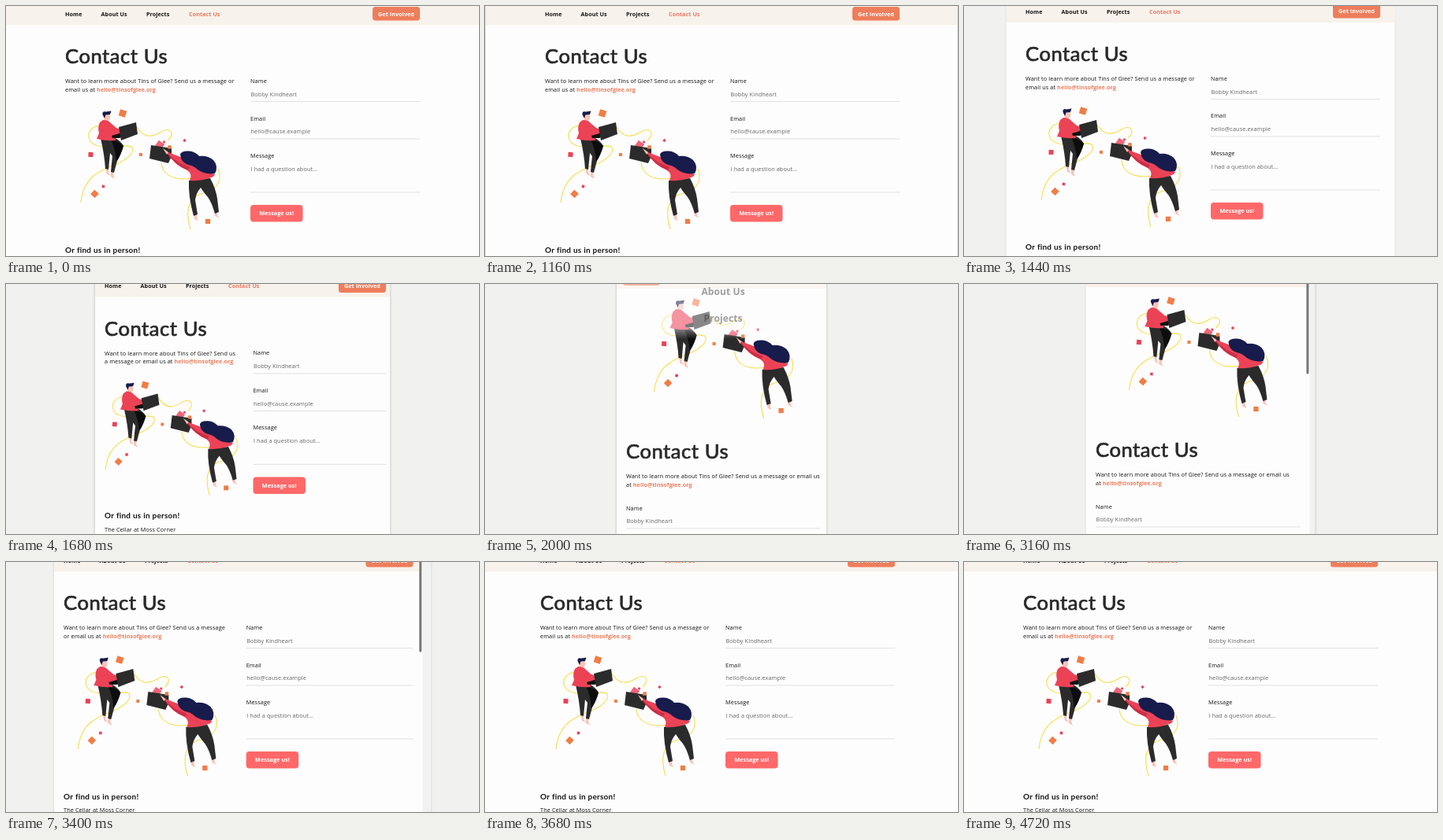
An HTML page with a canvas for the animation above (4.76 s loop, 600 by 318 pixels).

```html
<!DOCTYPE html>
<html lang="en">
<head>
<meta charset="utf-8">
<title>Responsive contact page</title>
<style>
  html, body { margin: 0; width: 100%; height: 100%; overflow: hidden; background: #f1f1f0; }
  canvas { display: block; width: 600px; height: 318px; }
</style>
</head>
<body>
<canvas id="stage"></canvas>
<script>
const W = 600, H = 318, LOOP = 4760, STEP = 40;
const LAYOUT_LAG = 14, BREAKPOINT = 351, PAD = 12, MAX_WIDTH = 450;
const RED = '#ec4256', ORANGE = '#f07d47', NAVY = '#171c4c', BLACK = '#2b2b2b',
      SKIN = '#f9c3b8', YELLOW = '#f8dc4c', INK = '#151515', TITLE = '#282828',
      CORAL = '#ee7d5b', PAPER = '#fdfdfd';
const SANS = '"Open Sans", sans-serif', ROUND = 'Lato, sans-serif';

const canvas = document.getElementById('stage');
const ctx = canvas.getContext('2d');
const dpr = window.devicePixelRatio || 1;
canvas.width = W * dpr;
canvas.height = H * dpr;

// [time, value] pairs
const HALF_WIDTH = [[0, 300], [1140, 300], [1160, 299], [1280, 286], [1680, 187], [1840, 157],
  [2000, 133], [2320, 114], [3020, 114], [3060, 120], [3160, 145.5], [3520, 286], [3640, 287], [3680, 300]];
const SCROLL = [[0, 0], [1280, 0], [1680, 7.6], [2000, 18], [2500, 18], [2800, 20], [3200, 20], [3260, 12]];

function track(keys, t) {
  const i = keys.findIndex(k => k[0] > t);
  if (i < 0) return keys[keys.length - 1][1];
  if (i === 0) return keys[0][1];
  const [t0, a] = keys[i - 1], [t1, b] = keys[i];
  return a + (b - a) * (t - t0) / (t1 - t0);
}

function setFont(weight, size, spacing, family = SANS) {
  ctx.font = `${weight} ${size}px ${family}`;
  ctx.letterSpacing = spacing + 'px';
}
const regular = () => setFont(400, 7.3, 0.1);
const bold = () => setFont(700, 7.2, 0.06);

function text(str, x, y, color = INK, align = 'left') {
  ctx.textAlign = align;
  ctx.fillStyle = color;
  ctx.fillText(str, x, y);
}

function box(x, y, w, h, r, color) {
  ctx.fillStyle = color;
  ctx.beginPath();
  ctx.roundRect(x, y, w, h, r);
  ctx.fill();
}

function button(label, x, y, w, h, r, color) {
  box(x, y, w, h, r, color);
  bold();
  text(label, x + w / 2, y + h / 2 + 2.7, '#fff', 'center');
}

function shape(d, color) {
  ctx.fillStyle = color;
  ctx.fill(new Path2D(d));
}

function confetti(x, y, size, degrees, color) {
  ctx.save();
  ctx.translate(x, y);
  ctx.rotate(degrees * Math.PI / 180);
  ctx.fillStyle = color;
  ctx.fillRect(-size / 2, -size / 2, size, size);
  ctx.restore();
}

function ribbon(d) {
  ctx.strokeStyle = YELLOW;
  ctx.lineWidth = 1.1;
  ctx.stroke(new Path2D(d));
}

function drawMan() {
  shape('M126 205L130 205L130 212L133 216L128 214Z M133 209L137 209L136 215L138 220L133 217Z', SKIN);
  shape('M120 168L137 167Q146 172 149 178Q146 189 141 197L137 212L133 211Q134 200 135 191L132 187L130 208L126 207Q125 190 120 168Z', BLACK);
  shape('M133 170Q144 172 149 178Q146 189 140 198Q139 182 133 170Z', '#0d0d0d');
  shape('M124 138L132 138L132 144Q130 147 125 147Z', SKIN);
  shape('M122.5 138Q122 133 127 134.5L133.5 133.5L132 138L126.5 138.5L125 143Z', NAVY);
  shape('M123 145Q130 145 133 149L140 155L146 157L146 163L138 165L139 171Q128 172 115 169L118 162Q116 154 119 148Z', RED);
  shape('M134 165L144 162L150 165L144 168L135 168Z', '#111');
  shape('M143 154L165 148L167 163L146 171Z', BLACK);
}

function drawWoman() {
  shape('M238 264L243 264L242 269L244 273L239 271Z M264 260L269 260L268 266L271 270L265 267Z', SKIN);
  shape('M232 222L259 219Q266 232 268 245L270 262L265 264Q261 250 256 243Q250 236 247 231Q241 238 240 247L243 265L238 267Q231 242 232 222Z', BLACK);
  confetti(195, 177, 9, 35, '#ee6478');
  shape('M184 177L210 181L210 191L206 200L182 194Z', BLACK);
  shape('M203 185Q213 189 224 193L240 203Q255 210 265 214Q264 218 257 219Q246 223 233 222Q237 214 230 209Q214 203 203 185Z', RED);
  shape('M206 189L219 199L233 205L231 209Q215 203 204 187Z', '#c92f48');
  shape('M199 181L206 186L204 189Z', SKIN);
  shape('M221 189Q222 184 232 184.5Q240 185 245 191Q256 190 263 196Q270 204 265 213Q252 215 243 208Q238 203 231 202Q222 199 221 189Z', NAVY);
}

function drawIllustration(cx, top, scale) {
  ctx.save();
  ctx.translate(cx, top);
  ctx.scale(scale, scale);
  ctx.translate(-182.5, -128);
  ribbon('M95 250C98 222 112 212 135 203C155 196 163 186 160 180C155 173 118 187 107 172C100 160 112 150 124 153');
  ribbon('M166 154C176 170 187 166 197 160C207 153 216 162 205 171');
  ribbon('M197 199C198 214 212 223 236 219M269 207C276 225 265 235 247 239C229 246 228 264 234 284');
  drawMan();
  drawWoman();
  confetti(148, 136.5, 8.5, 17, ORANGE);
  confetti(112.5, 239, 7.5, 43, ORANGE);
  confetti(171, 189, 4, 5, ORANGE);
  confetti(207.5, 179.5, 4.5, 3, ORANGE);
  confetti(256, 274, 6.3, 0, ORANGE);
  confetti(107.5, 189, 6, 4, RED);
  confetti(123.5, 229.5, 3.5, 8, RED);
  confetti(200.5, 173, 2.8, 15, RED);
  confetti(226.5, 171, 3.2, 45, RED);
  ctx.restore();
}

// Draws the wrapped paragraph and returns the number of lines.
function drawIntro(x, y, width) {
  const address = 'hello@tinsofglee.org';
  const words = 'Want to learn more about Tins of Glee? Send us a message or email us at'.split(' ');
  bold();
  const addressWidth = ctx.measureText(address).width;
  regular();
  const space = ctx.measureText(' ').width;
  let dx = 0, lines = 1;
  words.forEach((word, i) => {
    const w = ctx.measureText(word).width;
    // The address stays on the same line as the word before it.
    const tail = i === words.length - 1 ? space + addressWidth : 0;
    if (dx + w + tail > width + 0.5) { dx = 0; lines++; }
    text(word, x + dx, y + (lines - 1) * 10.7);
    dx += w + space;
  });
  bold();
  text(address, x + dx, y + (lines - 1) * 10.7, CORAL);
  return lines;
}

function drawField(label, hint, x, y, w, lineY) {
  regular();
  text(label, x, y);
  text(hint, x + 0.5, y + 16.6, '#666');
  ctx.fillStyle = '#e2e2e2';
  ctx.fillRect(x, y + lineY, w, 1);
}

function drawForm(x, y, w) {
  drawField('Name', 'Bobby Kindheart', x, y, w, 23);
  drawField('Email', 'hello@cause.example', x, y + 47.5, w, 23);
  drawField('Message', 'I had a question about...', x, y + 95, w, 43.5);
  button('Message us!', x, y + 155, 66.5, 21.5, 4, '#ff6868');
}

function drawTitle(x, y) {
  setFont(400, 25.6, 0.55, ROUND);
  text('Contact Us', x, y, TITLE);
  ctx.strokeStyle = TITLE;
  ctx.lineWidth = 0.7;
  ctx.strokeText('Contact Us', x, y);
}

function drawVisit(x, y) {
  setFont(700, 10, 0.24, ROUND);
  text('Or find us in person!', x, y);
  regular();
  text('The Cellar at Moss Corner', x, y + 16.8);
}

function drawWide(x, w) {
  const col = (w - 20) / 2;
  bold();
  [['Home', 0], ['About Us', 45.5], ['Projects', 103], ['Contact Us', 157]].forEach(([label, dx]) =>
    text(label, x + dx, 12.8, label === 'Contact Us' ? '#ea7860' : INK));
  button('Get Involved', x + w - 60, 1, 60, 17.6, 3.5, CORAL);
  drawTitle(x, 73.2);
  const extra = (drawIntro(x, 98.3, col) - 2) * 10.7;
  const scale = Math.min(1, col / 177);
  drawIllustration(x + col / 2, 128 + extra, scale);
  drawVisit(x, 313.5 + extra - 163 * (1 - scale));
  drawForm(x + col + 20, 98, col);
}

function drawNarrow(x, w) {
  button('Get Involved', x - 4, 2, 47, 18, 3.5, CORAL);
  drawIllustration(x + w / 2, 33, 1);
  drawTitle(x, 240);
  const extra = (drawIntro(x, 264.8, w) - 2) * 10.7;
  drawForm(x, 305.5 + extra, w);
}

// Mobile menu fading away after the layout switches.
function drawMenu(t, left, pageWidth) {
  const alpha = 1 - (t - 1760) / 430;
  if (t < 1760 || alpha <= 0) return;
  const bottom = 70 + (2000 - t) * 0.2;
  const veil = ctx.createLinearGradient(0, bottom - 14, 0, bottom);
  veil.addColorStop(0, PAPER);
  veil.addColorStop(1, 'rgba(253,253,253,0)');
  ctx.save();
  ctx.globalAlpha = alpha;
  ctx.beginPath();
  ctx.rect(left, 0, pageWidth, bottom);
  ctx.clip();
  ctx.fillStyle = veil;
  ctx.fillRect(left, 0, pageWidth, bottom);
  setFont(700, 12, 0.1);
  ['About Us', 'Projects', 'Contact Us'].forEach((label, i) =>
    text(label, left + pageWidth / 2, 14 + i * 33.5, i === 2 ? CORAL : TITLE, 'center'));
  ctx.restore();
}

function render(time) {
  const t = Math.floor(time % LOOP / STEP) * STEP;
  const half = track(HALF_WIDTH, t), left = 300 - half, full = half >= 300;
  const pageWidth = 2 * track(HALF_WIDTH, t - LAYOUT_LAG);
  const w = Math.min(MAX_WIDTH, pageWidth - 2 * PAD);
  const x = Math.round(left + (pageWidth - w) / 2);
  const paintWidth = full ? W : pageWidth;

  ctx.setTransform(dpr, 0, 0, dpr, 0, 0);
  ctx.fillStyle = '#f1f1f0';
  ctx.fillRect(0, 0, W, H);

  ctx.save();
  if (!full) {
    ctx.shadowColor = 'rgba(0,0,0,.25)';
    ctx.shadowBlur = 3 * dpr;
  }
  ctx.fillStyle = '#f2f2f2';
  ctx.fillRect(left, -8, half * 2, H + 16);
  ctx.restore();

  ctx.save();
  ctx.beginPath();
  ctx.rect(left, 0, half * 2, H);
  ctx.clip();
  ctx.fillStyle = PAPER;
  ctx.fillRect(left, 0, paintWidth, H);
  ctx.save();
  ctx.translate(0, -track(SCROLL, t));
  const wide = pageWidth >= BREAKPOINT;
  ctx.fillStyle = wide ? '#f7f2eb' : '#fbf0e9';
  ctx.fillRect(left, 0, paintWidth, 24);
  (wide ? drawWide : drawNarrow)(x, w);
  ctx.restore();
  drawMenu(t, left, pageWidth);
  if (t >= 2480 && t <= 3520) box(left + pageWidth - 4, -3, 3, 117.5, 1.5, '#777');
  ctx.restore();
}

const start = performance.now();
function loop() {
  render(performance.now() - start);
  requestAnimationFrame(loop);
}
loop();
</script>
</body>
</html>
```
